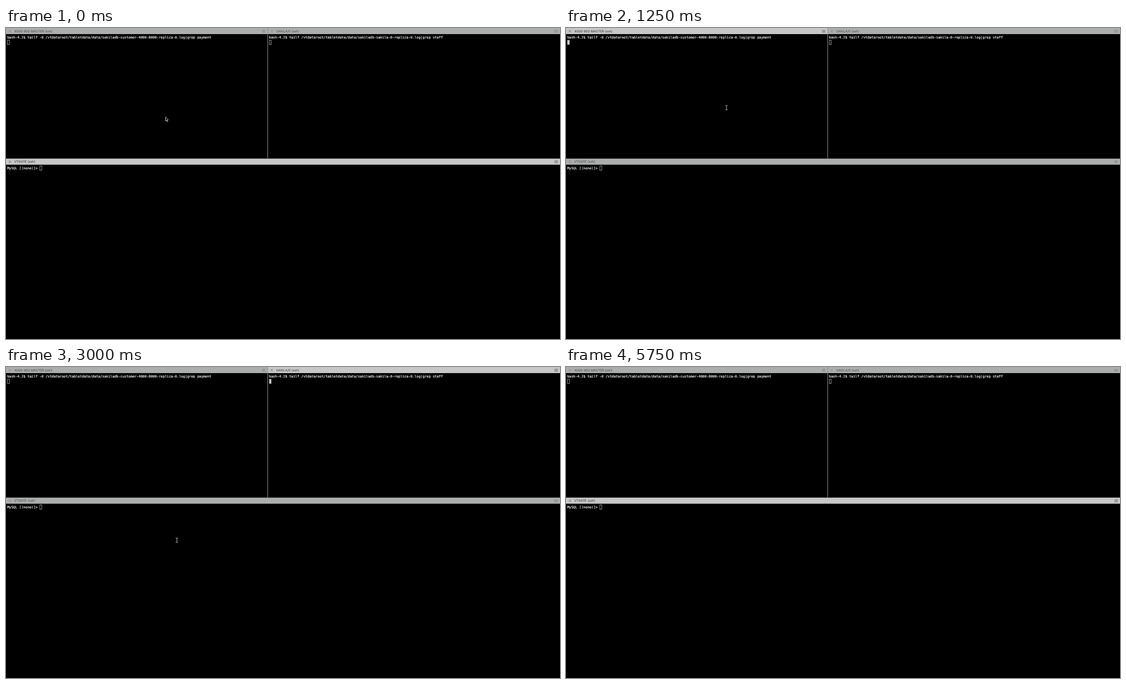
Animation, 998 px wide and 561 px high, one loop 8 s. Source, as an HTML page:

```html
<!DOCTYPE html>
<html lang="en">
<head>
<meta charset="utf-8">
<title>Terminal panes</title>
<style>
  html, body { margin: 0; width: 100%; height: 100%; overflow: hidden; background: #000; }
  svg { display: block; width: 998px; height: 561px; }
  text { text-rendering: geometricPrecision; white-space: pre; }
  .line { font: 6.05px "DejaVu Sans Mono", monospace; fill: #fff; stroke: #fff; stroke-width: .15; }
  .title { font: 5.75px Inter, sans-serif; fill: #484848; }
  .bar { fill: #acadad; }
  .icon { fill: none; stroke: #808080; stroke-width: .8; }
  .active .bar { fill: #c6c7c6; }
  .active .title { fill: #333; }
  .active .icon { stroke: #606060; }
  .caret { fill: none; stroke: #c8c8c8; stroke-width: .7; }
  .filled .caret { fill: #c8c8c8; }
  #beam { fill: none; stroke: #d0d0d0; stroke-width: .9; }
  #arrow { fill: #000; stroke: #e8e8e8; stroke-width: .8; }
</style>
</head>
<body>
<svg viewBox="0 0 998 561">
  <g id="panes"></g>
  <path d="M471.5 0V235.5" stroke="#8c8c8c"/>
  <path id="arrow" d="M.4 .6V7.6L2 6.2L3.2 8.9L4.4 8.4L3.2 5.8H5.3Z"/>
  <path id="beam" d="M-2-4.1H-.9L0-3.4L.9-4.1H2M0-3.4V3.4M-2 4.1H-.9L0 3.4L.9 4.1H2"/>
</svg>
<script>
const LOOP = 8000;
const $ = id => document.getElementById(id);

const panes = [
  { x: 0, y: 0, w: 471, title: "4000-800 MASTER (ssh)", caret: [2.7, 22],
    text: "bash-4.2$ tailf -0 /vtdataroot/tabletdata/data/sakiladb-customer-4000-8000-replica-0.log|grep payment" },
  { x: 471.6, y: 0, w: 526.4, title: "SAKILA/0 (ssh)", caret: [2.7, 22],
    text: "bash-4.2$ tailf /vtdataroot/tabletdata/data/sakiladb-sakila-0-replica-0.log|grep staff" },
  { x: 0, y: 235.6, w: 998, title: "VTGATE (ssh)", caret: [61, 13.2],
    text: "MySQL [(none)]> " }
];

$("panes").innerHTML = panes.map(({ x, y, w, title, caret, text }) => `
  <g transform="translate(${x} ${y})">
    <rect class="bar" width="${w}" height="11"/>
    <path class="icon" d="M5 3.6l4.2 4.2m0-4.2l-4.2 4.2M${w - 10} 4h6.2m-6.2 1.8h6.2m-6.2 1.8h6.2"/>
    <text class="title" x="15" y="7.8">${title}</text>
    <text class="line" x="2.2" y="19.2">${text}</text>
    <rect class="caret" x="${caret[0]}" y="${caret[1]}" width="3.4" height="7.8"/>
  </g>`).join("");
const groups = [...$("panes").children];

// Each step: start time, then its values; a step holds until the next.
const focus = [[0, 2], [750, 0], [2250, 1], [3500, 2]];
const gateCaret = [[0, false], [750, true], [1000, false], [3500, true], [5750, false]];
const pointer = [
  [0, "arrow", 287, 160], [500, "arrow", 269, 148],
  [750, "beam", 269.2, 149.7], [1250, "beam", 289.2, 143.7],
  [1500, "beam", 506.8, 98.7], [1750, "beam", 583.2, 89.7],
  [2500, "beam", 560.2, 111.7], [2750, "beam", 353.2, 289.7],
  [3000, "beam", 307.8, 312.5], [4000, "beam", 811.6, 193.7],
  [4250, "beam", 847.2, 203], [4500, "beam", 859.6, 202.7],
  [4750, "none", 0, 0]
];

const at = (steps, t) => steps.findLast(s => s[0] <= t).slice(1);

function draw(now) {
  const t = now % LOOP;
  const [active] = at(focus, t);
  const [gateOn] = at(gateCaret, t);
  groups.forEach((g, i) => {
    g.classList.toggle("active", i === active);
    g.classList.toggle("filled", i === 2 ? gateOn : i === active);
  });
  const [shape, x, y] = at(pointer, t);
  for (const id of ["arrow", "beam"]) {
    $(id).setAttribute("visibility", id === shape ? "visible" : "hidden");
    $(id).setAttribute("transform", `translate(${x} ${y})`);
  }
}

const start = performance.now();
function tick() {
  draw(performance.now() - start);
  requestAnimationFrame(tick);
}
tick();
</script>
</body>
</html>
```
